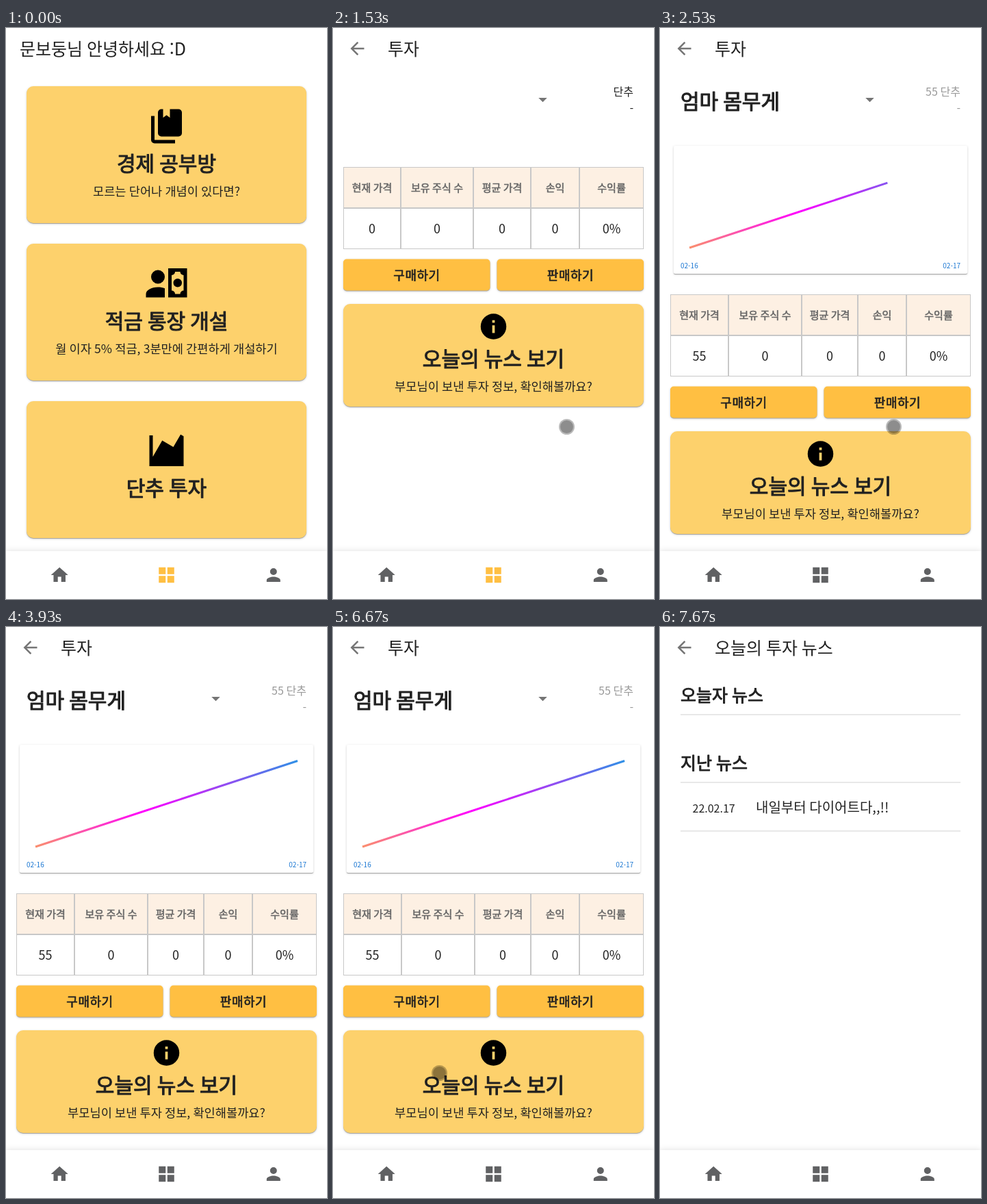
An HTML page that plays this animation: 469 px wide and 834 px high, repeating every 8 s.

```html
<!DOCTYPE html>
<html lang="ko">
<head>
<meta charset="utf-8">
<style>
html, body { margin: 0; width: 100%; height: 100%; overflow: hidden; background: #fff; }
svg { display: block; font-family: "Noto Sans CJK KR", "Noto Sans CJK", "Noto Sans", sans-serif; }
text { white-space: pre; word-spacing: -.045em; }
.medium { stroke: currentColor; stroke-width: .038em; stroke-linejoin: round; }
.raised { filter: drop-shadow(0 1px .5px rgba(0,0,0,.24)) drop-shadow(0 1px 1.5px rgba(0,0,0,.2)); }
.bar { filter: drop-shadow(0 0 4px rgba(0,0,0,.13)); }
</style>
</head>
<body>
<svg id="stage" width="469" height="834" viewBox="0 0 469 834"></svg>
<script>
const LOOP = 8000, INVEST = 1530, LOADED = 1600, NEWS = 7200;
const INK = '#212121', GREY = '#606163', AMBER = '#ffbf42', CARD = '#fdd16c';
const ICON = {
  books: 'M19 18H9A2 2 0 0 1 7 16V4A2 2 0 0 1 9 2H10V7L12 5.5L14 7V2H19A2 2 0 0 1 21 4V16A2 2 0 0 1 19 18M17 20V22H5A2 2 0 0 1 3 20V6H5V20H17Z',
  cash: 'M11 8a4 4 0 1 1-8 0a4 4 0 1 1 8 0M11 14.72V20H0V18C0 15.79 3.13 14 7 14C8.5 14 9.87 14.27 11 14.72M24 20H13V3H24ZM16 11.5a2.5 2.5 0 1 0 5 0a2.5 2.5 0 1 0-5 0M22 7A2 2 0 0 1 20 5H17A2 2 0 0 1 15 7V16A2 2 0 0 1 17 18H20A2 2 0 0 1 22 16Z',
  area: 'M2 3H4V15.54L9.5 6L16 9.78L20.24 2.45L22 3.47V21H2Z',
  info: 'M12 2a10 10 0 1 0 0 20a10 10 0 1 0 0-20M13 17h-2v-6h2zM13 9h-2V7h2z',
  back: 'M20 11H7.83l5.59-5.59L12 4l-8 8 8 8 1.41-1.41L7.83 13H20z',
  down: 'M7 10l5 5 5-5z',
  home: 'M10 20v-6h4v6h5v-8h3L12 3 2 12h3v8z',
  grid: 'M3 3h8v8H3zM3 13h8v8H3zM13 3h8v8h-8zM13 13h8v8h-8z',
  person: 'M12 12a4 4 0 1 0 0-8a4 4 0 1 0 0 8M12 14c-2.67 0-8 1.34-8 4v2h16v-2c0-2.66-5.33-4-8-4z'
};

const text = (x, y, size, str, { anchor = 'middle', medium = false, fill = INK, spacing = 0 } = {}) =>
  `<text x="${x}" y="${y}" font-size="${size}" text-anchor="${anchor}" fill="${fill}" color="${fill}" letter-spacing="${spacing}" class="${medium ? 'medium' : ''}">${str}</text>`;
const left = { anchor: 'start' }, medium = { medium: true };
const icon = (name, x, y, size, fill = '#000', extra = '') =>
  `<path d="${ICON[name]}" fill="${fill}" fill-rule="evenodd" transform="translate(${x} ${y}) scale(${size / 24})" ${extra}/>`;
const rect = (x, y, w, h, fill, extra = '') =>
  `<rect x="${x}" y="${y}" width="${w}" height="${h}" fill="${fill}" ${extra}/>`;
const raised = (x, y, w, h, fill, r) => rect(x, y, w, h, fill, `rx="${r}" class="raised"`);
const heading = str => icon('back', 20.5, 15, 30, '#757575') + text(80, 39.5, 25, str, left);

function homePage() {
  return text(20, 39.5, 25, '문보둥님 안녕하세요 :D', left) +
    [85, 315, 545].map(y => raised(30, y, 409, 200, CARD, 10)).join('') +
    icon('books', 204.5, 113.5, 60) + text(234.5, 208.5, 30, '경제 공부방', medium) +
    text(234.5, 244.5, 17.6, '모르는 단어나 개념이 있다면?') +
    icon('cash', 204.5, 343.5, 60) + text(234.5, 438.5, 30, '적금 통장 개설', medium) +
    text(234.5, 474.5, 17.6, '월 이자 5% 적금, 3분만에 간편하게 개설하기') +
    icon('area', 204.5, 587.5, 60) + text(234.5, 682.5, 30, '단추 투자', medium);
}

function table(y, edges, price) {
  const labels = ['현재 가격', '보유 주식 수', '평균 가격', '손익', '수익률'];
  const values = [price, 0, 0, 0, '0%'];
  return labels.map((label, i) => {
    const x = edges[i], w = edges[i + 1] - x, mid = x + w / 2;
    const cell = (top, fill) => rect(x + .5, top + .5, w - 1, 59, fill, 'stroke="#c8c8c8"');
    return cell(y, '#fdf0e3') + cell(y + 60, '#fff') +
      text(mid, y + 36, 15, label, { medium: true, fill: '#666' }) +
      text(mid, y + 97, 18, values[i]);
  }).join('');
}

function investPage(loaded) {
  const fill = loaded ? '#999' : INK;
  const edges = loaded ? [15, 100, 207, 289, 360, 454] : [15, 99, 205, 289, 360, 454];
  const button = (x, str) => raised(x, 337.5, 214.5, 46, AMBER, 5) +
    text(x + 107.5, 367.5, 18, str, { medium: true, spacing: .514 });
  const chart = text(30, 117.5, 30, '엄마 몸무게', { ...left, ...medium }) +
    raised(20, 172, 429, 187, '#fff', 2) +
    '<path id="trend" d="M43 321L426 195.5" pathLength="1" stroke="url(#hue)" stroke-width="3" stroke-dasharray="1 2"/>' +
    text(30, 351, 10, '02-16', { anchor: 'start', fill: '#1976d2' }) +
    text(439, 351, 10, '02-17', { anchor: 'end', fill: '#1976d2' });
  return heading('투자') + icon('down', 291.5, 89.5, 30, '#757575') +
    text(439, 98.5, 16, loaded ? '55 단추' : '단추', { anchor: 'end', fill }) +
    text(439, 124, 16, '-', { anchor: 'end', fill }) + (loaded ? chart : '') +
    `<g transform="translate(0 ${loaded ? 186 : 0})">` +
    table(203, edges, loaded ? 55 : 0) + button(15, '구매하기') + button(239.5, '판매하기') +
    raised(15, 403, 439, 150, CARD, 10) + icon('info', 212, 413.5, 45) +
    text(234.5, 493.5, 30, '오늘의 뉴스 보기', medium) +
    text(234.5, 529.5, 17.6, '부모님이 보낸 투자 정보, 확인해볼까요?') + '</g>';
}

function newsPage() {
  const section = (y, str) => text(30, y, 25, str, { ...left, ...medium });
  return heading('오늘의 투자 뉴스') +
    [127, 226, 297].map(y => rect(30, y, 409, 2, '#e8e8e8')).join('') +
    section(108.5, '오늘자 뉴스') + section(207.5, '지난 뉴스') +
    text(47.5, 270.5, 16, '22.02.17', left) + text(140, 270.5, 20, '내일부터 다이어트다,,!!', left);
}

const stage = document.getElementById('stage');
stage.innerHTML = `<defs><linearGradient id="hue">
    <stop stop-color="#fa8f6e"/><stop offset=".42" stop-color="#f0f"/><stop offset="1" stop-color="#2f90e6"/>
  </linearGradient></defs>` +
  [homePage(), investPage(false), investPage(true), newsPage()].map(p => `<g class="page">${p}</g>`).join('') +
  rect(0, 764, 469, 70, '#fff', 'class="bar"') +
  icon('home', 63.2, 784, 30, GREY) + icon('grid', 219.5, 784, 30, AMBER, 'id="tab"') + icon('person', 375.8, 784, 30, GREY) +
  '<g id="cursor"><circle r="11.5" fill-opacity=".27"/><circle r="9.5" fill-opacity=".24"/></g>';

const pages = [...stage.querySelectorAll('.page')];
const [trend, tab, cursor] = ['trend', 'tab', 'cursor'].map(id => document.getElementById(id));
const clamp = v => Math.min(1, Math.max(0, v));

// CSS "ease": cubic-bezier(.25, .1, .25, 1), solved by bisection
function ease(p) {
  const bezier = (s, a, b) => 3 * s * (1 - s) ** 2 * a + 3 * s * s * (1 - s) * b + s ** 3;
  let lo = 0, hi = 1;
  for (let i = 0; i < 24; i++) {
    const mid = (lo + hi) / 2;
    if (bezier(mid, .25, .25) < p) lo = mid; else hi = mid;
  }
  return bezier(lo, .1, 1);
}

// Pointer visits: from, to, x, y
const visits = [
  [1000, 1070, 368.5, 582.5], [1070, 1330, 341.5, 582.5], [INVEST, 3930, 341.5, 582.5],
  [5470, 6200, 143.5, 565.5], [6670, 7000, 155.5, 651.5], [NEWS, 7470, 155.5, 651.5]
];

function draw(t) {
  const current = t < INVEST ? 0 : t < LOADED ? 1 : t < NEWS ? 2 : 3;
  pages.forEach((page, i) => page.style.display = i === current ? '' : 'none');
  trend.setAttribute('stroke-dashoffset', 1 - ease(clamp((t - 1618) / 2000)));
  tab.style.fill = `color-mix(in srgb, ${GREY} ${clamp((t - LOADED) / 250) * 100}%, ${AMBER})`;
  const visit = visits.find(([from, to]) => t >= from && t < to);
  cursor.style.display = visit ? '' : 'none';
  if (visit) cursor.setAttribute('transform', `translate(${visit[2]} ${visit[3]})`);
}

const start = performance.now();
function tick() {
  draw((performance.now() - start) % LOOP);
  requestAnimationFrame(tick);
}
tick();
</script>
</body>
</html>
```
